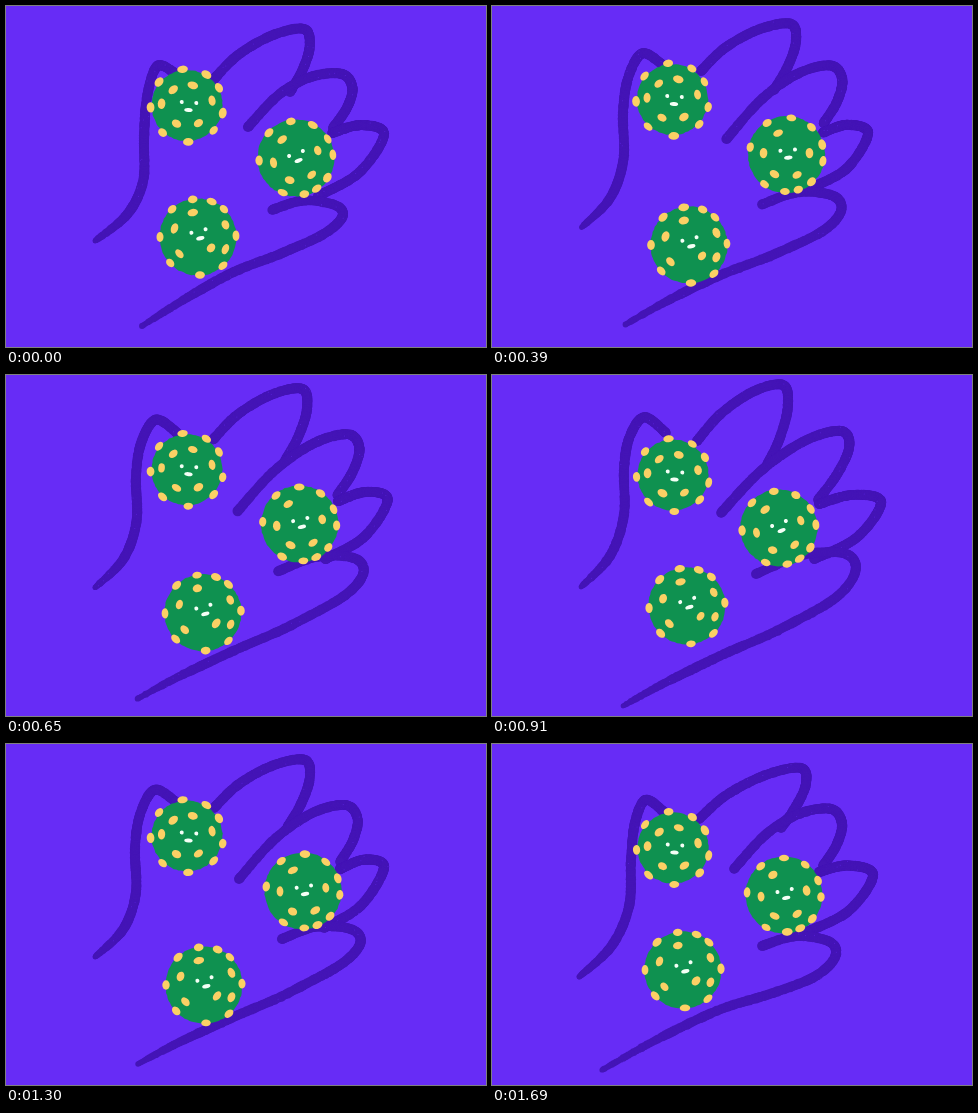
Write an HTML page with a canvas that moves like this. It is 480 px wide and 341 px high and loops after 1820 ms.

```html
<!DOCTYPE html>
<html lang="en">
<head>
<meta charset="utf-8">
<title>Germs on a hand</title>
<style>
  html, body { margin: 0; width: 100%; height: 100%; overflow: hidden; background: #672cf6; }
  canvas { display: block; width: 100vw; height: 100vh; }
</style>
</head>
<body>
<canvas id="stage" width="480" height="341"></canvas>
<script>
const ctx = document.getElementById('stage').getContext('2d');
const BG = '#672cf6', INK = '#4414b6', GREEN = '#0f9150', YELLOW = '#fbd065', WHITE = '#f4fff6';
const STEP = 130, STEPS = 14, BRUSH = 4.9, RAD = Math.PI / 180;

// The resting hand: thumb, index, middle, ring, then little finger with palm edge.
const hand = [
  [90,230, 119,199, 133,158, 133,110, 138,74, 152,49, 173,61],
  [210,66, 234,43, 268,25, 299,20, 304,38, 296,62, 283,84],
  [236,131, 270,92, 306,66, 338,58, 349,72, 343,95, 329,117],
  [328,128, 352,122, 374,131, 355,163, 320,180],
  [264,202, 300,190, 336,194, 344,210, 326,230, 282,248, 230,265, 182,289, 135,317]
];

// Each key moves the start, tip and end of every line, and sets x, y, turn of each germ.
const keys = [
  { at: 0,
    bend: [[-1,5, 5,22, -4,6], [-2,7, -1,3, 1,2], [6,-10, -2,10, -2,5], [-2,-1, 4,-3, -8,10],
           [2,2, -5,6, -10,-1, 0,0, 1,3]],
    germs: [[181,99.5,0], [290,152,0], [192,231,0]] },
  { at: 1,
    bend: [[-3,3, 6,6, -1,7], [-3,9, 10,4, 6,0], [6,-6, 1,7, 2,5], [-1,0, 7,0, -5,8],
           [6,0, 2,4, -4,3, -3,1, -25,9]],
    germs: [[181,104,0], [292,151,8], [191,226,0]] },
  { at: 2,
    bend: hand.map(() => [0,0, 0,0]),
    germs: [[180,95,0], [292,150,20], [196,237,0]] },
  { at: 4,
    bend: [[-1,-17, -4,-5, -3,-3], [-2,-2, 0,-4, -2,0], [-3,4, 1,3, 5,1], [6,-3, 4,-8, -2,4],
           [12,-7, 11,-8, 8,-9, 0,7, -3,3]],
    germs: [[181,92,0], [297,147,11], [198,241,0]] },
  { at: 7,
    bend: [[-1,-18, -1,-16, 1,-3], [-5,0, -8,-10, -8,6], [-7,7, 11,-2, -3,8], [-1,1, 15,-4, 2,4],
           [0,-3, 18,-15, 16,-6, 0,15, -4,14]],
    germs: [[181,100,0], [287,153,0], [195,231,-3]] }
];

// Spots sit on rings: radius, then the angle of each spot in degrees.
const germs = [
  { r: 35.5, face: [2, -3, 4],
    rings: [[36.5, -97, -58, -29, -140, 12, 43, 88, 132, 177], [25.5, -11, 184], [21, -131, -74, 57, 120]] },
  { r: 38.5, face: [0, -4.5, -20],
    rings: [[37, -98, -63, -31, -137, -5, 32, 56, 77, 111, 176], [23, -127, -19, 47, 106, 168]] },
  { r: 38.5, face: [0.5, -6, -14],
    rings: [[38, -98, -69, -133, -47, -2, 49, 87, 137, 180], [30, -24, 24], [25, -102, 138, 200], [17, 40]] }
];

// Point at t (0 to 1) on a smooth curve through x, y pairs.
function spline(pts, t) {
  const n = pts.length / 2 - 1, k = Math.min(n - 1, Math.floor(t * n)), f = t * n - k;
  return [0, 1].map(axis => {
    const at = i => pts[Math.max(0, Math.min(n, i)) * 2 + axis];
    const a = at(k - 1), b = at(k), c = at(k + 1), d = at(k + 2);
    return b + f / 2 * (c - a + f * (2 * a - 5 * b + 4 * c - d + f * (3 * (b - c) + d - a)));
  });
}

function random(seed) {
  return () => {
    seed = (seed * 16807) % 2147483647;
    return seed / 2147483647;
  };
}

function oval(x, y, rx, ry = rx, angle = 0) {
  ctx.beginPath();
  ctx.ellipse(x, y, rx, ry, angle, 0, Math.PI * 2);
  ctx.fill();
}

// place(t) gives the brush position; thin(t) scales its radius.
function brush(place, thin, rnd) {
  const dabs = 200, flecks = [];
  ctx.fillStyle = INK;
  for (let i = 0; i <= dabs; i++) {
    const t = i / dabs, [x, y] = place(t);
    const r = BRUSH * thin(t) + (rnd() - 0.5) * 0.6;
    oval(x, y, r);
    if (rnd() < 0.03) flecks.push([x + (rnd() - 0.5) * r * 1.7, y + (rnd() - 0.5) * r * 1.7]);
  }
  ctx.fillStyle = 'rgba(103,44,246,.6)';
  flecks.forEach(([x, y]) => oval(x, y, 0.5));
}

function drawGerm({ r, face, rings }, [x, y, turn], rnd) {
  ctx.save();
  ctx.translate(x, y);
  ctx.rotate(turn * RAD);

  ctx.fillStyle = GREEN;
  ctx.beginPath();
  for (let a = 0; a < 360; a += 4) {
    const d = r + (rnd() - 0.5) * 0.8;
    ctx.lineTo(Math.cos(a * RAD) * d, Math.sin(a * RAD) * d);
  }
  ctx.fill();

  ctx.fillStyle = YELLOW;
  for (const [radius, ...angles] of rings) {
    for (const a of angles) {
      oval(Math.cos(a * RAD) * radius, Math.sin(a * RAD) * radius,
        4.7 + rnd() * 0.7, 3.3 + rnd() * 0.6, (a + 90) * RAD);
    }
  }

  const [fx, fy, tilt] = face;
  ctx.translate(fx, fy);
  ctx.rotate(tilt * RAD);
  ctx.fillStyle = WHITE;
  oval(-7.3, 0, 2);
  oval(7.3, 0, 2);
  oval(0, 7.5, 4.2, 2);
  ctx.restore();
}

function draw(pose) {
  const next = Math.max(1, keys.findIndex(key => key.at >= pose));
  const a = keys[next - 1], b = keys[next], f = (pose - a.at) / (b.at - a.at);
  const lerp = (p, q) => p.map((v, i) => v + (q[i] - v) * f);
  const rnd = random(pose * 977 + 31);

  ctx.fillStyle = BG;
  ctx.fillRect(0, 0, 480, 341);
  hand.forEach((line, i) => {
    const place = t => {
      const [x, y] = spline(line, t);
      const [dx, dy] = lerp(spline(a.bend[i], t), spline(b.bend[i], t));
      return [x + dx, y + dy];
    };
    // The wrist ends of the first and last lines taper off.
    const wrist = t => i === 0 ? t : i === hand.length - 1 ? 1 - t : 1;
    brush(place, t => Math.min(1, 0.55 + wrist(t) * 3), rnd);
  });
  germs.forEach((germ, i) => drawGerm(germ, lerp(a.germs[i], b.germs[i]), rnd));
}

// The poses run forward, then back.
let shown = -1;
const began = performance.now();
function tick() {
  const step = Math.floor((performance.now() - began) / STEP) % STEPS;
  const pose = Math.min(step, STEPS - step);
  if (pose !== shown) draw(shown = pose);
  requestAnimationFrame(tick);
}
tick();
</script>
</body>
</html>
```
